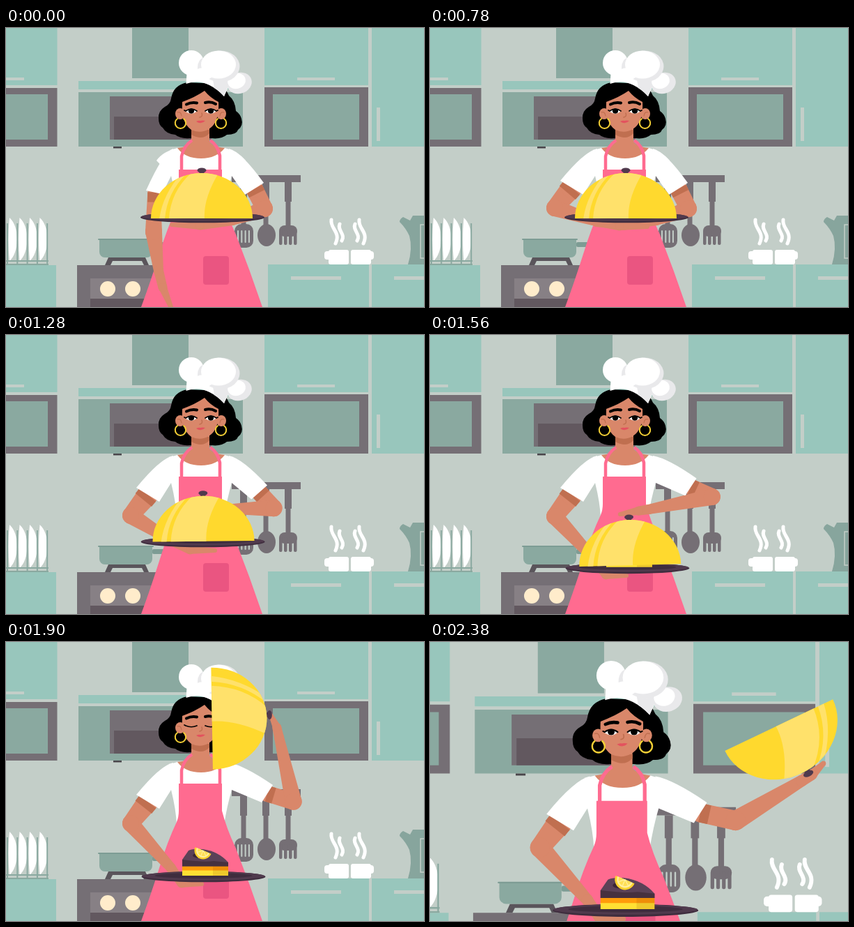
These frames come from a looping animation (600x400 px, 2.4 s). An HTML page with a canvas:

```html
<!DOCTYPE html>
<html lang="en">
<head>
<meta charset="utf-8">
<title>Chef serving cake</title>
<style>
html, body { margin: 0; width: 100%; height: 100%; overflow: hidden; background: #c3cec8; }
canvas { display: block; width: 600px; height: 400px; }
</style>
</head>
<body>
<canvas id="stage" width="600" height="400"></canvas>
<script>
const ctx = document.getElementById('stage').getContext('2d');
const LOOP = 2400;
const C = {
  wall: '#c3cec8', mint: '#98c6bc', sage: '#8aa9a0', gray: '#756f75', dark: '#62585f',
  skin: '#d9876a', shade: '#c06f50', pink: '#ff6b90', pocket: '#ea5581', white: '#ffffff',
  cloud: '#e9e9eb', hair: '#000000', gold: '#ffd92e', light: '#ffe16b',
  plum: '#503a4d', plumDark: '#3f2d3e'
};

const rect = (color, x, y, w, h, r = 0) => {
  ctx.fillStyle = color;
  ctx.beginPath();
  ctx.roundRect(x, y, w, h, r);
  ctx.fill();
};
const fill = (color, d) => {
  ctx.fillStyle = color;
  ctx.fill(new Path2D(d));
};
const stroke = (color, width, d, cap = 'round') => {
  ctx.strokeStyle = color;
  ctx.lineWidth = width;
  ctx.lineCap = cap;
  ctx.stroke(new Path2D(d));
};
const oval = (color, x, y, rx, ry = rx, rot = 0) => {
  ctx.fillStyle = color;
  ctx.beginPath();
  ctx.ellipse(x, y, rx, ry, rot, 0, 7);
  ctx.fill();
};

const clamp = u => Math.min(1, Math.max(0, u));
const smooth = u => (1 - Math.cos(Math.PI * clamp(u))) / 2;
const bump = u => Math.sin(Math.PI * u);
const mix = (a, b, u) => a + (b - a) * u;
const blend = (p, q, u) => p.map((v, i) => mix(v, q[i], u));
const polar = ([x, y], r, deg) => {
  const a = deg * Math.PI / 180;
  return [x + r * Math.cos(a), y - r * Math.sin(a)];
};

// Progress of each movement, 0 to 1.
function progress(t) {
  return {
    raise: smooth(t / 660),
    lower: smooth(clamp((t - 1100) / 540) ** 0.78),
    swing: smooth((t - 1580) / 600),
    eyes: Math.min(...[550, 1890].map(c => smooth((Math.abs(t - c) - 35) / 115))),
    zoom: 1 + 0.175 * clamp((t - 2260) / 120) ** 1.5
  };
}

function limb([x1, y1], w1, [x2, y2], w2) {
  const a = Math.atan2(y2 - y1, x2 - x1) + Math.PI / 2;
  const c = Math.cos(a) / 2, s = Math.sin(a) / 2;
  ctx.fillStyle = C.skin;
  ctx.beginPath();
  ctx.moveTo(x1 + c * w1, y1 + s * w1);
  ctx.lineTo(x2 + c * w2, y2 + s * w2);
  ctx.lineTo(x2 - c * w2, y2 - s * w2);
  ctx.lineTo(x1 - c * w1, y1 - s * w1);
  ctx.fill();
  oval(C.skin, x1, y1, w1 / 2);
  oval(C.skin, x2, y2, w2 / 2);
}

function cupboards() {
  rect(C.wall, 0, 0, 600, 400);
  rect(C.mint, 0, 0, 73.5, 82);
  rect(C.wall, 0, 71, 26, 4);
  rect(C.gray, 0, 86, 73.5, 84);
  rect(C.sage, 0, 95, 60, 65);

  rect(C.sage, 181, 0, 81, 72);
  rect(C.mint, 104, 76, 236, 12);
  rect(C.sage, 104, 92, 236, 78);
  rect(C.gray, 149, 98, 146, 62);
  rect(C.dark, 155, 127, 134, 33);
  rect('#4a464b', 154, 170, 12, 2.5);

  rect(C.mint, 371, 0, 149, 82);
  rect(C.wall, 418, 71, 54, 4);
  rect(C.mint, 525, 0, 75, 170);
  rect(C.wall, 532, 114, 5, 48);
  rect(C.gray, 371, 85, 149, 85);
  rect(C.sage, 383, 95, 124, 65);

  rect(C.mint, 0, 340, 72, 60);
  rect(C.mint, 376, 339, 145, 61);
  rect(C.wall, 409, 356, 72, 5);
  rect(C.mint, 525, 339, 75, 61);
  rect(C.wall, 557, 356, 43, 5);
}

function utensils() {
  rect(C.gray, 324, 211, 99, 10);
  for (const x of [341, 373, 405]) {
    rect(C.gray, x - 5, 221, 10, 28);
    rect(C.gray, x - 3.5, 248, 7, 40);
  }
  rect(C.gray, 328, 281, 27, 34, 10);
  for (let x = 333; x < 350; x += 5.3) rect(C.wall, x - 1, 290, 2, 18, 1);
  oval(C.gray, 374, 297, 13, 16);
  rect(C.gray, 392, 283, 26, 16, 8);
  for (let x = 394; x < 417; x += 7) rect(C.gray, x - 2, 290, 4.5, 21, 2);
}

function tableware() {
  for (let x = 8; x < 60; x += 14.5) {
    fill(C.white, `M${x - 3} 272Q${x + 8} 282 ${x + 8} 304Q${x + 7} 325 ${x - 3} 334Q${x - 6} 303 ${x - 3} 272Z`);
  }
  for (let x = 2; x < 61; x += 14.3) rect(C.sage, x - 1, 280, 2, 59);
  rect(C.sage, 0, 333, 61, 2);
  rect(C.sage, 0, 338, 61, 2);

  rect(C.gray, 102, 340, 180, 60);
  rect('#878085', 121, 359, 150, 41);
  rect(C.dark, 121, 388, 150, 12);
  for (const x of [146, 182]) oval('#ffeccb', x, 374, 11);
  fill('#5a555b', 'M147 329H200L205 340H198L195 334H153L150 340H142Z');
  rect(C.sage, 134, 303, 76, 26, [0, 0, 8, 8]);
  rect('#7d9c94', 132, 302, 80, 2, 1);
  rect('#7d9c94', 210, 307, 22, 7, 2);

  rect(C.white, 457, 320, 12, 12, 4);
  rect(C.white, 518, 320, 10, 12, 4);
  for (const x of [463, 495]) rect(C.white, x, 318, 29, 21, 3);
  for (const [long, short] of [[467, 479], [507, 501]]) {
    stroke(C.white, 5, `M${long} 275c-2 13 14 17 6 34`);
    stroke(C.white, 5, `M${short} 281c-4 9 9 15 3 24`);
  }

  fill('#87a59d', 'M565 278Q565 274 570 271L580 276L584 269H600V339H577Q584 316 579 298Q574 287 565 278Z');
  stroke(C.wall, 1.5, 'M600 282H595V330H600');
}

function body() {
  fill(C.white, 'M246 172Q225 177 216 190L237 212Q244 240 245 262H313Q317 236 324 212L344 190Q332 176 314 172Z');
  fill(C.skin, 'M246 172Q264 170 266 163V140H292V163Q296 170 314 172Q302 187 280 187Q257 187 246 172Z');
  fill(C.shade, 'M266 146H292V151Q282 162 266 153Z');
  stroke(C.pink, 4.5, 'M252 206V184Q255 169 267 161M307 206V183Q304 168 293 161', 'butt');
  fill(C.pink, 'M248 203H310V242Q316 266 330 296Q350 347 368 400H194Q207 365 220 324Q232 285 245 258Q248 251 248 242Z');
  rect(C.pocket, 283, 327, 37, 41, 4);
}

function eye(x, side, open) {
  ctx.save();
  ctx.translate(x, 119);
  if (open > 0.08) {
    ctx.save();
    ctx.scale(1, open);
    ctx.clip(new Path2D('M-8 1Q-1 -8 8 0Q1 7 -8 1Z'));
    rect(C.white, -9, -7, 18, 14);
    oval(C.hair, 0, -0.3, 4.2);
    ctx.restore();
  }
  const lid = 4.5 - 10.5 * open, corner = 1 - open;
  stroke(C.hair, 1.7, `M-8 ${corner}Q0 ${lid} 8 ${corner}M${side * 8} ${corner}l${side * 2} -1`);
  ctx.restore();
}

function head(open) {
  for (const x of [250, 309]) oval(C.skin, x, 123, 7, 8);
  stroke(C.shade, 1.2, 'M246 121Q251 119 252 126M313 121Q308 119 307 126');
  fill(C.skin, 'M253 106C252 125 255 138 266 146Q279 152 291 145C303 138 306 122 305 106Q293 100 285 90Q272 99 253 106Z');
  stroke(C.hair, 4, 'M259 109.5Q266 106 274 107.5M286 107Q294 105 301 109');
  eye(266, -1, open);
  eye(294, 1, open);
  stroke(C.shade, 1.5, 'M281 122Q283 127 278 128');
  fill('#e3525e', 'M273 134Q277 132 279 133Q282 132 286 133Q280 139 273 134Z');
  stroke('#f3cf35', 2, 'M246 130A7.7 7.7 0 1 0 255 130M304 130A7.7 7.7 0 1 0 313 130');
}

const hairBack = () => fill(C.hair,
  'M260 78Q240 82 237 101Q236 109 228 113Q218 119 219 130Q219 139 225 143Q230 152 243 153Q250 159 264 158H294'
  + 'Q309 160 317 153Q331 153 333 146Q341 140 338 130Q336 123 330 119Q329 104 320 97Q316 88 308 80Z');

function hat() {
  fill(C.white, 'M260 58L258.5 80Q286 70 313 98L326 70Z');
  fill(C.cloud, 'M297 74L326 66L313 98Q306 90 299 86Z');
  oval(C.white, 266, 50, 18, 18);
  oval(C.cloud, 335, 79, 18, 15, -0.3);
  oval(C.white, 331, 76, 13, 11, -0.3);
  oval(C.cloud, 284, 57, 9, 14);
  oval(C.cloud, 308, 55, 27.5, 22.5);
  oval(C.white, 305, 52.5, 25, 20);
  oval(C.white, 283, 66, 14, 9);
}

// Arm from the sleeve's cuff to the fingertips; every joint is a point.
function arm(cuff, shoulder, pit, elbow, wrist, palm, tip) {
  const [ox, oy, ix, iy] = cuff, [sx, sy] = shoulder;
  const mid = [(ox + ix) / 2, (oy + iy) / 2];
  const width = Math.hypot(ox - ix, oy - iy) * 0.78;
  const band = blend(mid, elbow, 0.25);
  limb(mid, width, elbow, 24);
  stroke(C.shade, width, `M${mid}L${band}`, 'butt');
  limb(elbow, 24, wrist, 14);
  limb(wrist, 14, palm, 13);
  limb(palm, 12, tip, 6);
  fill(C.white, `M${sx} ${sy}Q${mix(sx, ox, 0.35)} ${sy + 4} ${ox} ${oy}L${ix} ${iy}L${pit}Z`);
}

function leftArm({ raise, lower }) {
  const joint = (hang, hold, low) => blend(blend(hang, hold, raise), low, lower);
  arm(
    blend([201, 233, 224, 238], [187, 219, 220, 239], raise),
    [240, 173], [237, 212],
    joint([212, 292], [179, 258], [179, 260]),
    joint([219, 348], [238, 277], [237, 324]),
    joint([225, 372], [272, 284], [252, 346]),
    joint([238, 403], [312, 285], [281, 347])
  );
}

const rightElbow = ({ lower, swing }) =>
  blend(blend([371, 259], [406, 231], lower), [418, 227], swing);

function rightArm(p) {
  const elbow = rightElbow(p);
  const joint = (hold, grip, reach, angle) => {
    if (p.swing > 0) return polar(elbow, reach, angle - 161 * p.swing);
    const [x, y] = blend(hold, grip, p.lower);
    return [x, y - 18 * bump(p.lower)];
  };
  arm(
    blend([370, 222, 343, 239], [383, 205, 367, 230], p.lower),
    [320, 173], [324, 212], elbow,
    joint([325, 276], [314, 251], 94, 192),
    joint([278, 283], [300, 253], 109, 192),
    joint([238, 282], [274, 258], 128, 194)
  );
}

function trayAndCake({ lower }) {
  const x = mix(282, 283.5, lower), y = mix(271.5, 336.5, lower);
  oval(C.plumDark, x, y, 89, 7.8);
  oval(C.plum, x, y - 1, 88, 6.2);
  oval(C.plumDark, x, y - 1.5, 70, 4);
  ctx.save();
  ctx.translate(x - 283.5, y - 336.5);
  rect('#ffe033', 253, 327, 66, 8);
  rect('#ff9c0a', 253, 321, 66, 6.5);
  fill('#5b4257', 'M253 312L262 299Q268 296 282 297Q305 300 319 316V321.5H253Z');
  fill('#47313f', 'M253 312Q285 316 298 314L319 316V321.5H253Z');
  rect('rgba(138, 59, 0, 0.14)', 297, 321, 22, 14);
  oval('#3a2735', 279, 306, 11, 4);
  ctx.translate(283, 299);
  ctx.rotate(0.4);
  for (const [color, r] of [['#ffd42e', 12.5], ['#fff0a0', 10], ['#ffdf55', 8]]) {
    ctx.fillStyle = color;
    ctx.beginPath();
    ctx.arc(0, 0, r, 0, Math.PI);
    ctx.fill();
  }
  stroke('#fff0a0', 1, 'M0 0L-6 5M0 0V8M0 0L6 5');
  ctx.restore();
}

// The cover rides on the tray, then turns about the elbow with the hand.
function cover(p) {
  const { lower, swing } = p, turn = bump(swing);
  const height = 65 + 14 * turn;
  const [x, y] = swing > 0
    ? polar(rightElbow(p), mix(155.7, 128, swing) + 27 * turn, 220.4 - 154.8 * swing)
    : [mix(281, 287.5, lower), mix(273, 332, lower)];
  const knob = -7 * swing;
  ctx.save();
  ctx.translate(x, y);
  ctx.rotate((156 * swing + 4 * turn - 1.5 * lower) * Math.PI / 180);
  oval(C.plum, knob, -height - 4, 6.5, 3.5);
  rect(C.plum, knob - 3.5, -height - 4, 7, 6);
  ctx.scale(1, height / 65);
  ctx.beginPath();
  ctx.ellipse(0, 0, 73, 65, 0, Math.PI, 2 * Math.PI);
  ctx.closePath();
  ctx.clip();
  rect(C.gold, -75, -67, 150, 68);
  fill(C.light, 'M-47 1Q-45 -40 -12 -68H26Q2 -30 4 1Z');
  fill(C.light, 'M-61 1Q-56 -35 -28 -66H-20Q-50 -38 -53 1Z');
  ctx.restore();
}

function zoomed(scale, x, y, draw) {
  ctx.save();
  ctx.translate(x, y);
  ctx.scale(scale, scale);
  ctx.translate(-x, -y);
  draw();
  ctx.restore();
}

function frame(t) {
  const p = progress(t);
  zoomed(p.zoom, 331, 64, () => {
    cupboards();
    utensils();
    tableware();
  });
  zoomed(p.zoom, 300, 61, () => {
    hairBack();
    body();
    head(p.eyes);
    hat();
    rightArm(p);
    leftArm(p);
    trayAndCake(p);
    cover(p);
  });
}

const start = performance.now();
function tick() {
  frame((performance.now() - start) % LOOP);
  requestAnimationFrame(tick);
}
tick();
</script>
</body>
</html>
```
